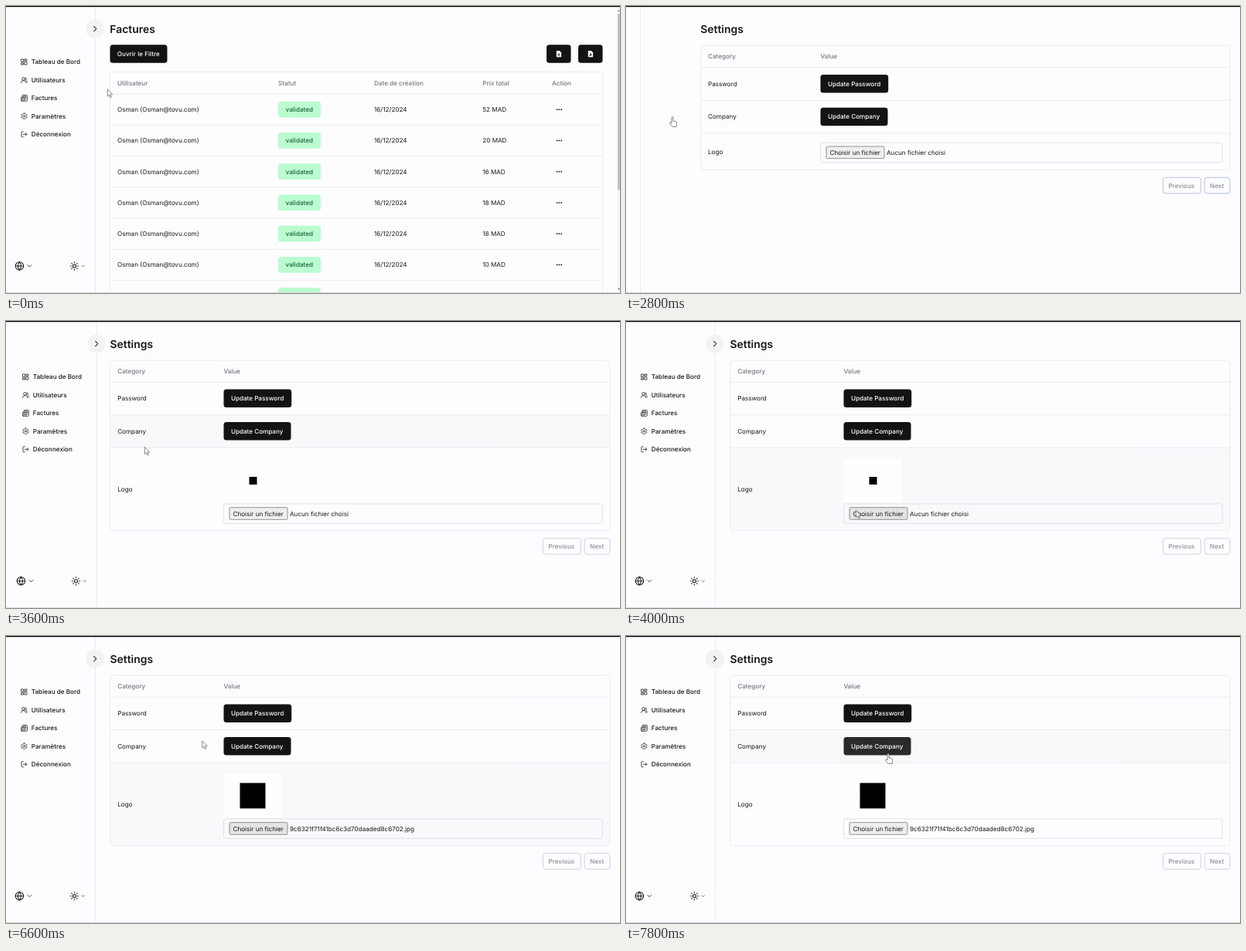
An HTML page that plays this animation: 794 by 372 pixels, repeating every 8 s.

```html
<!DOCTYPE html>
<html lang="fr">
<head>
<meta charset="utf-8">
<title>Factures</title>
<style>
html, body { margin: 0; width: 100%; height: 100%; overflow: hidden; background: #fdfcfe; }
svg { display: block; }
text { font: 400 8.14px Inter, sans-serif; fill: #18181b; text-rendering: geometricPrecision; white-space: pre; }
.medium, .muted, .light, .badge { font-weight: 500; }
.title { font-size: 13.95px; font-weight: 600; }
.muted { fill: #77767d; }
.light { fill: #fff; }
.faint { font-weight: 500; fill: #8e8d94; }
.badge { fill: #17663a; }
.line { stroke: #ececf0; fill: none; }
.icon { fill: none; stroke: #18181b; stroke-width: 2; stroke-linecap: round; stroke-linejoin: round; }
.dark { fill: #131316; }
.tint { fill: #f9f8fb; }

/* every move is a hard step on a 200 ms grid (2.5%) */
.anim { animation: 8s step-end infinite; }
#invoices { animation-name: invoices; }
#loading { animation-name: loading; }
#settings { animation-name: settings; }
#sidebar { animation-name: slide; }
#menu { animation-name: menu; }
#linkHover { animation-name: linkHover; }
#companyHover { animation-name: companyHover; }
#logoHover { animation-name: logoHover; }
#fileButton { animation-name: fileButton; }
#companyButton { animation-name: companyButton; }
.before { animation-name: before; }
.after { animation-name: after; }
#cursor { animation-name: cursor; }
#arrow { animation-name: arrow; }
#hand { animation-name: hand; }

@keyframes invoices { 0% { opacity: 1 } 35%, 100% { opacity: 0 } }
@keyframes loading { 0% { opacity: 0 } 35% { opacity: 1 } 37.5%, 100% { opacity: 0 } }
@keyframes settings { 0% { opacity: 0 } 37.5%, 100% { opacity: 1 } }
@keyframes menu { 0% { opacity: 1 } 35% { opacity: 0 } 37.5%, 100% { opacity: 1 } }
@keyframes slide {
  0% { transform: none }
  35% { transform: translateX(-97px) }
  37.5% { transform: translateX(-35px) }
  40% { transform: translateX(-7px) }
  42.5% { transform: translateX(1px) }
  45% { transform: translateX(2px) }
  47.5% { transform: translateX(1px) }
  50%, 100% { transform: none }
}
@keyframes linkHover { 0% { opacity: 0 } 7.5% { opacity: 1 } 35%, 100% { opacity: 0 } }
@keyframes companyHover {
  0% { opacity: 0 } 42.5% { opacity: 1 } 47.5% { opacity: 0 }
  85% { opacity: 1 } 90% { opacity: 0 } 95%, 100% { opacity: 1 }
}
@keyframes logoHover {
  0% { opacity: 0 } 47.5% { opacity: 1 } 85% { opacity: 0 }
  90% { opacity: 1 } 95%, 100% { opacity: 0 }
}
@keyframes fileButton { 0% { fill: #efefef } 50% { fill: #e4e4e5 } 85%, 100% { fill: #efefef } }
@keyframes companyButton { 0% { fill: #131316 } 95% { fill: #202023 } 97.5%, 100% { fill: #2a2a2d } }
@keyframes before { 0% { opacity: 1 } 82.5%, 100% { opacity: 0 } }
@keyframes after { 0% { opacity: 0 } 82.5%, 100% { opacity: 1 } }
@keyframes cursor {
  0% { transform: translate(131px, 107.5px) }
  5% { transform: translate(104px, 122px) }
  7.5% { transform: translate(64px, 139px) }
  10% { transform: translate(59px, 141px) }
  12.5% { transform: translate(56px, 143px) }
  37.5% { transform: translate(60px, 143px) }
  40% { transform: translate(90px, 150px) }
  42.5% { transform: translate(140px, 160px) }
  45% { transform: translate(179px, 163px) }
  47.5% { transform: translate(232px, 205px) }
  50% { transform: translate(297px, 245px) }
  52.5% { transform: translate(309px, 248.5px) }
  82.5% { transform: translate(253.5px, 135.5px) }
  90% { transform: translate(354.5px, 257px) }
  92.5% { transform: translate(354.5px, 207px) }
  95%, 100% { transform: translate(335px, 152px) }
}
@keyframes arrow {
  0% { opacity: 1 } 7.5% { opacity: 0 } 37.5% { opacity: 1 }
  87.5% { opacity: 0 } 90% { opacity: 1 } 95%, 100% { opacity: 0 }
}
@keyframes hand { 0% { opacity: 0 } 7.5% { opacity: 1 } 37.5% { opacity: 0 } 95%, 100% { opacity: 1 } }
</style>
</head>
<body>
<svg id="stage" width="794" height="372" viewBox="0 0 794 372"></svg>
<script>
// y is the vertical middle of the capitals
const text = (x, y, s, cls = '') => `<text x="${x}" y="${y + 2.95}" class="${cls}">${s}</text>`;
const title = (x, s) => `<text x="${x}" y="34.5" class="title">${s}</text>`;
const rect = (x, y, w, h, r, attrs) =>
  `<rect x="${x}" y="${y}" width="${w}" height="${h}" rx="${r}" ${attrs}/>`;
const rule = (x1, x2, y) => `<path class="line" d="M${x1} ${y}H${x2}"/>`;
const icon = (x, y, body, size = 9.3) =>
  `<g class="icon" transform="translate(${x} ${y - size / 2}) scale(${size / 24})">${body}</g>`;
const path = d => `<path d="${d}"/>`;
const group = (id, body) => `<g id="${id}" class="anim">${body}</g>`;

function gear() {
  let d = '';
  for (let i = 0; i <= 72; i++) {
    const a = i * Math.PI / 36, r = 8.8 + 1.3 * Math.cos(6 * a);
    d += (i ? 'L' : 'M') + (12 + r * Math.sin(a)).toFixed(1) + ' ' + (12 - r * Math.cos(a)).toFixed(1);
  }
  return path(d + 'z') + '<circle cx="12" cy="12" r="3"/>';
}

function sun() {
  let rays = '';
  for (let a = 0; a < 360; a += 45) rays += `<path d="M12 2v2" transform="rotate(${a} 12 12)"/>`;
  return '<circle cx="12" cy="12" r="4"/>' + rays;
}

const links = [
  ['Tableau de Bord', path('M3 3h7v9H3zM14 3h7v5h-7zM14 12h7v9h-7zM3 16h7v5H3z')],
  ['Utilisateurs', '<circle cx="10" cy="8" r="5"/>' + path('M2 21a8 8 0 0 1 16 0M22 20c0-3.4-2-6.5-4-8a5 5 0 0 0-.5-8.3')],
  ['Factures', path('M4 22h16a2 2 0 0 0 2-2V4a2 2 0 0 0-2-2H8a2 2 0 0 0-2 2v16a2 2 0 0 1-4 0v-9q0-2 2-2h2M18 14h-8M15 18h-5M10 6h8v4h-8z')],
  ['Paramètres', gear()],
  ['Déconnexion', path('M9 21H5a2 2 0 0 1-2-2V5a2 2 0 0 1 2-2h4M16 17l5-5-5-5M21 12H9')]
];

const chevron = path('M6 9l6 6 6-6');

function sidebar() {
  const items = links.map(([name, art], i) => {
    const y = 72.5 + i * 23.45;
    return icon(18.8, y, art) + text(32.8, y, name, 'medium');
  }).join('');
  const menu = group('linkHover', rect(11.5, 132.5, 92, 21, 3.5, 'fill="#f4f3f5"')) + items +
    '<circle cx="115" cy="29.5" r="12" fill="#f3f2f4"/>' +
    icon(109, 29.5, path('M9 18l6-6-6-6'), 12.5) +
    icon(11.2, 337, '<circle cx="12" cy="12" r="10"/>' + path('M2 12h20M12 2a15 15 0 0 0 0 20a15 15 0 0 0 0-20'), 12.5) +
    icon(25.6, 337, chevron, 9.6) + icon(82.2, 337, sun(), 12.5) + icon(96.3, 337, chevron, 7);
  return group('sidebar', '<path class="line" d="M115.5 1V371"/>' + group('menu', menu));
}

function fileIcon(x, glyph) {
  return rect(x - 13.5, 50.3, 31.5, 23.4, 3.5, 'class="dark"') +
    `<g transform="translate(${x - .7} 58)"><path d="M0 .6Q0 0 .6 0H4L6.3 2.3V7.6Q6.3 8.2 5.7 8.2H.6Q0 8.2 0 7.6z" fill="#fff"/>
    <path d="${glyph}" fill="none" stroke="#131316" stroke-width=".8"/></g>`;
}

function invoices() {
  const cols = [[144, 'Utilisateur'], [352, 'Statut'], [476, 'Date de création'], [616.3, 'Prix total'], [706, 'Action']];
  const rows = [52, 20, 16, 18, 18, 10, 10].map((price, i) => {
    const y = 134.2 + i * 40.25;
    const dots = [712.6, 715.4, 718.2].map(x => `<circle cx="${x}" cy="${y}" r=".9" fill="#18181b"/>`).join('');
    return rule(135, 771, y - 20) + text(144, y, 'Osman (Osman@tovu.com)') +
      rect(352, y - 10.4, 55, 20.8, 3.5, 'fill="#bbfbd0"') + text(361.6, y, 'validated', 'badge') +
      text(476, y, '16/12/2024') + text(616.3, y, price + ' MAD') + dots;
  }).join('');
  return title(134.3, 'Factures') +
    rect(134.5, 50.3, 74, 23.4, 3.5, 'class="dark"') + text(143.8, 62, 'Ouvrir le Filtre', 'light') +
    fileIcon(712.5, 'M2 3.4L4.3 6.8M4.3 3.4L2 6.8') + fileIcon(753.5, 'M1.7 6.8Q3.4 5 3 3.2Q3.3 5.8 4.8 5.6Q3 5.4 1.7 6.8') +
    '<path class="line" d="M134.5 370V89Q134.5 85.5 138 85.5H768Q771.5 85.5 771.5 89V370"/>' +
    cols.map(([x, s]) => text(x, 100, s, 'muted')).join('') + rows +
    rect(790.5, 1, 3.5, 371, 0, 'fill="#f6f5f7"') + rect(791, 10, 3, 228.5, 0, 'fill="#c3c2c5"') +
    '<path d="M791 7l1.5-2 1.5 2zM791 366l1.5 2 1.5-2z" fill="#77767a"/>';
}

function fileInput(x, y, button, label) {
  return rect(x, y - 12.7, 771.3 - x, 25.4, 3, 'fill="none" stroke="#e1e0e5"') +
    rect(x + 7.5, y - 8, 75, 15.6, 1.5, `${button} stroke="#77767a" stroke-width=".8"`) +
    text(x + 12, y, 'Choisir un fichier') + label;
}

function pager(y, prev, next) {
  return rect(694.5, y - 10.3, 48.8, 20.6, 3, `fill="none" stroke="${prev}"`) + text(701.5, y, 'Previous', 'faint') +
    rect(748.2, y - 10.3, 32.8, 20.6, 3, `fill="none" stroke="${next}"`) + text(755, y, 'Next', 'faint');
}

// shared table: left edge, value column, row middles, rules and bottom
function settingsTable(left, value, [password, company, logo], rules, bottom) {
  return title(left - .2, 'Settings') +
    rect(left, 51, 781 - left, bottom - 51, 3.5, 'class="line"') +
    text(left + 9.5, 65, 'Category', 'muted') + text(value, 65, 'Value', 'muted') +
    rules.map(y => rule(left, 781, y)).join('') +
    text(left + 9.5, password, 'Password') + text(left + 9.5, company, 'Company') + text(left + 9.5, logo, 'Logo') +
    rect(value, password - 11.7, 87.7, 23.4, 3.5, 'class="dark"') + text(value + 9.4, password, 'Update Password', 'light') +
    rect(value, company - 11.7, 87, 23.4, 3.5, left > 100 ? 'id="companyButton" class="dark anim"' : 'class="dark"') +
    text(value + 9.4, company, 'Update Company', 'light');
}

function loading() {
  return settingsTable(96.5, 251.5, [100.8, 143.5, 188.8], [79.5, 122.5, 165], 212.3) +
    fileInput(251.5, 190, 'fill="#efefef"', text(337, 190, 'Aucun fichier choisi')) +
    pager(232.6, '#c3bfe0', '#b3c3ea');
}

function settings() {
  const label = `<g class="anim before">${text(367, 249.7, 'Aucun fichier choisi')}</g>
    <g class="anim after">${text(367, 249.7, '9c6321f71f41bc6c3d70daaded8c6702.jpg')}</g>`;
  return group('companyHover', rect(135, 122, 646, 42, 0, 'class="tint"')) +
    group('logoHover', rect(135, 164.5, 646, 107, 3, 'class="tint"')) +
    settingsTable(134.7, 281.5, [100.2, 142.8, 217.6], [79.3, 121.7, 164.3], 271.7) +
    rect(281.5, 178.5, 74.5, 57, 0, 'fill="#fefefe"') +
    rect(314.5, 202, 10, 10, 0, 'class="anim before"') +
    rect(302.5, 190.5, 33, 33, 0, 'class="anim after"') +
    fileInput(281.5, 249.7, 'id="fileButton" class="anim" fill="#efefef"', label) +
    pager(292, '#d5d1e0', '#d5d1e0');
}

const cursor = `<g id="arrow" class="anim"><path d="M.3 .3V9.5L2.4 7.6L3.9 11L5.3 10.4L3.8 7.1H6.7z"/></g>
  <g id="hand" class="anim"><path d="M3 8V1.6a1 1 0 0 1 2 0V6l3.6.8a1.4 1.4 0 0 1 1.1 1.5L9 13.5H4.2L.7 9.2a.9.9 0 0 1 1.3-1.2L3 9z"/></g>`;

document.getElementById('stage').innerHTML =
  rect(0, 0, 794, 372, 0, 'fill="#fdfcfe"') +
  group('invoices', invoices()) + group('loading', loading()) + group('settings', settings()) +
  sidebar() +
  rect(0, 371, 794, 1, 0, 'fill="#dddce0"') + rect(0, 0, 794, 1.2, 0, 'fill="#000"') +
  `<g id="cursor" class="anim" fill="#fff" stroke="#5c5b60" stroke-width=".75" stroke-linejoin="round">${cursor}</g>`;
</script>
</body>
</html>
```
